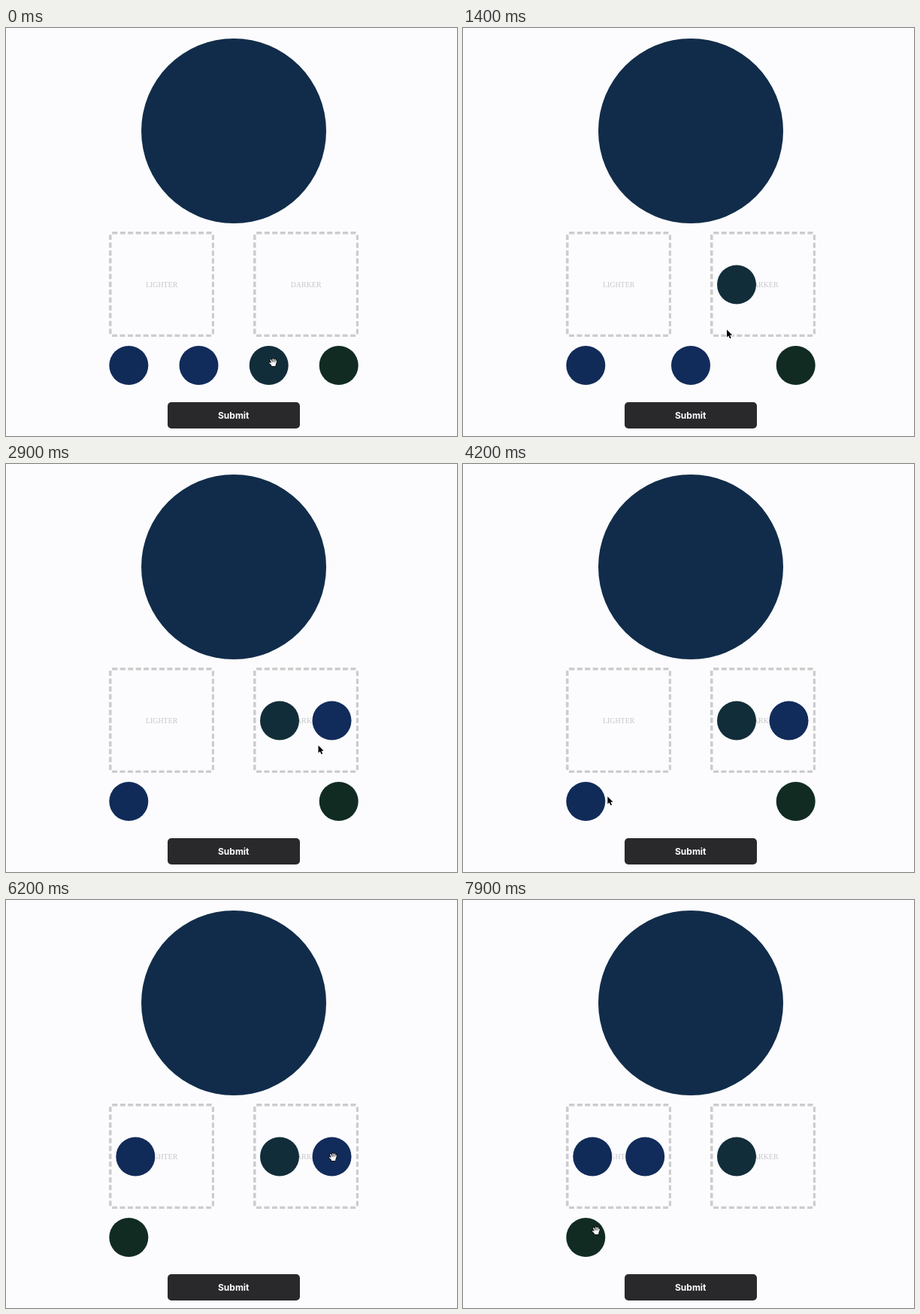
Recreate the animation shown at these times as an HTML page. Size 600 by 543 pixels, loop 8000 ms.

```html
<!DOCTYPE html>
<html lang="en">
<head>
<meta charset="utf-8">
<title>Sort the shades</title>
<style>
  html, body { margin: 0; width: 100%; height: 100%; overflow: hidden; background: #fcfcfe; }
  body { position: relative; }
  body > * { position: absolute; }
  .sample { left: 180px; top: 14px; width: 246px; height: 246px; border-radius: 50%; background: #112c4a; }
  .zone {
    top: 271px; width: 160px; height: 160px; box-sizing: border-box;
    border: 4px dashed #cccccd; border-radius: 5px;
    transform: scale(.877); transform-origin: 0 0;
    display: flex; align-items: center; justify-content: center;
    font: 11.3px "Liberation Serif", serif; color: #c6c7ca;
  }
  .ball { left: -26.3px; top: -26.3px; width: 52.6px; height: 52.6px; border-radius: 50%; }
  .drag { opacity: .7; z-index: 1; box-shadow: 0 3px 9px rgba(0, 0, 0, .22); }
  .submit {
    left: 215px; top: 498px; width: 175.5px; height: 35px; border-radius: 5px;
    background: #29282b; color: #fff; text-align: center;
    font: 700 12px/35px Inter, sans-serif;
  }
  svg { left: 0; top: 0; width: 1px; height: 1px; overflow: visible; z-index: 2; }
</style>
</head>
<body>
<div class="sample"></div>
<div class="zone" style="left:137px">LIGHTER</div>
<div class="zone" style="left:328.6px">DARKER</div>
<div class="submit">Submit</div>
<svg id="cursor">
  <path id="arrow" d="M0 0V10L2.3 7.9L4 11.8L5.7 11L4 7.2H7.2Z" stroke="#fff" stroke-width="1.6" paint-order="stroke"/>
  <g id="hand" stroke-linecap="round" stroke-linejoin="round">
    <path id="palm" d="M-1.5 1L-3-3.3M0 1V-4.3M1.8 1L2.5-3.8M3 2L4.2-1.8M-1.8 3L-4.3.8M-2 1H3L2.5 4.3H-1.3Z" stroke="#111" stroke-width="3.2"/>
    <use href="#palm" style="display:none"/>
    <path d="M-1.5 1L-3-3.3M0 1V-4.3M1.8 1L2.5-3.8M3 2L4.2-1.8M-1.8 3L-4.3.8M-2 1H3L2.5 4.3H-1.3Z" fill="#fff" stroke="#fff" stroke-width="1.4"/>
  </g>
</svg>
<script>
const LOOP = 8000, STEP = 100, RADIUS = 26.3;

// Resting places: [from ms, x, y]
const balls = [
  { color: '#112b59', slots: [[0, 163.3, 449], [5200, 172.3, 341.5]] },
  { color: '#112b5b', slots: [[0, 256.5, 449], [1000, 303, 449], [2600, 433.5, 341.5], [6800, 242.2, 341.5]] },
  { color: '#122d3a', slots: [[0, 349.7, 449], [1000, 364, 341.5]] },
  { color: '#112b23', slots: [[0, 442.7, 449], [5200, 163.3, 449]] },
];

// Drags: [ball, grab ms, drop ms]
const drags = [[2, 100, 1000], [1, 1800, 2600], [0, 4500, 5200], [1, 6300, 6800]];

// Pointer path: [ms, x, y]
const path = [
  [0, 355.3, 445], [100, 355.3, 445], [800, 380, 350], [1000, 380, 350],
  [1200, 356, 380], [1300, 356, 380], [1400, 351, 401.5], [1700, 308, 447],
  [1800, 308, 447], [2400, 424, 352], [2600, 424, 352], [2900, 415.5, 374.5],
  [3700, 415.5, 374.5], [4300, 174.5, 448], [4500, 174.5, 448], [5000, 175.3, 366],
  [5100, 179, 356], [5300, 179, 356], [6200, 435, 342], [6300, 445.5, 343],
  [6600, 236.5, 345], [6800, 240, 349], [7100, 240, 349], [7700, 172, 433],
  [7800, 172, 433], [7900, 177, 440], [8000, 177, 440],
];

const $ = id => document.getElementById(id);
const place = (el, [x, y]) => el.style.transform = `translate(${x}px,${y}px)`;

for (const ball of balls) {
  ball.el = document.createElement('div');
  ball.el.style.background = ball.color;
  document.body.append(ball.el);
}

function pointer(t) {
  const i = path.findIndex(key => key[0] > t);
  const [t0, x0, y0] = path[i - 1], [t1, x1, y1] = path[i];
  const u = (t - t0) / (t1 - t0), k = u * u * (3 - 2 * u);
  return [x0 + (x1 - x0) * k, y0 + (y1 - y0) * k];
}

const slotAt = (ball, t) => ball.slots.filter(s => s[0] <= t).pop().slice(1);

function draw(t) {
  const [px, py] = pointer(t);
  const drag = drags.find(([, grab, drop]) => t > grab && t < drop);
  let over = false;
  balls.forEach((ball, i) => {
    let [x, y] = slotAt(ball, t);
    const held = drag && drag[0] === i;
    if (held) {
      const [gx, gy] = pointer(drag[1]);
      x += px - gx;
      y += py - gy;
    }
    ball.el.className = held ? 'ball drag' : 'ball';
    place(ball.el, [x, y]);
    over ||= Math.hypot(px - x, py - y) < RADIUS;
  });
  place($('cursor'), [px, py]);
  $('hand').style.display = over ? '' : 'none';
  $('arrow').style.display = over ? 'none' : '';
}

const start = performance.now();
function tick() {
  const t = (performance.now() - start) % LOOP;
  draw(Math.floor(t / STEP) * STEP);
  requestAnimationFrame(tick);
}
tick();
</script>
</body>
</html>
```
